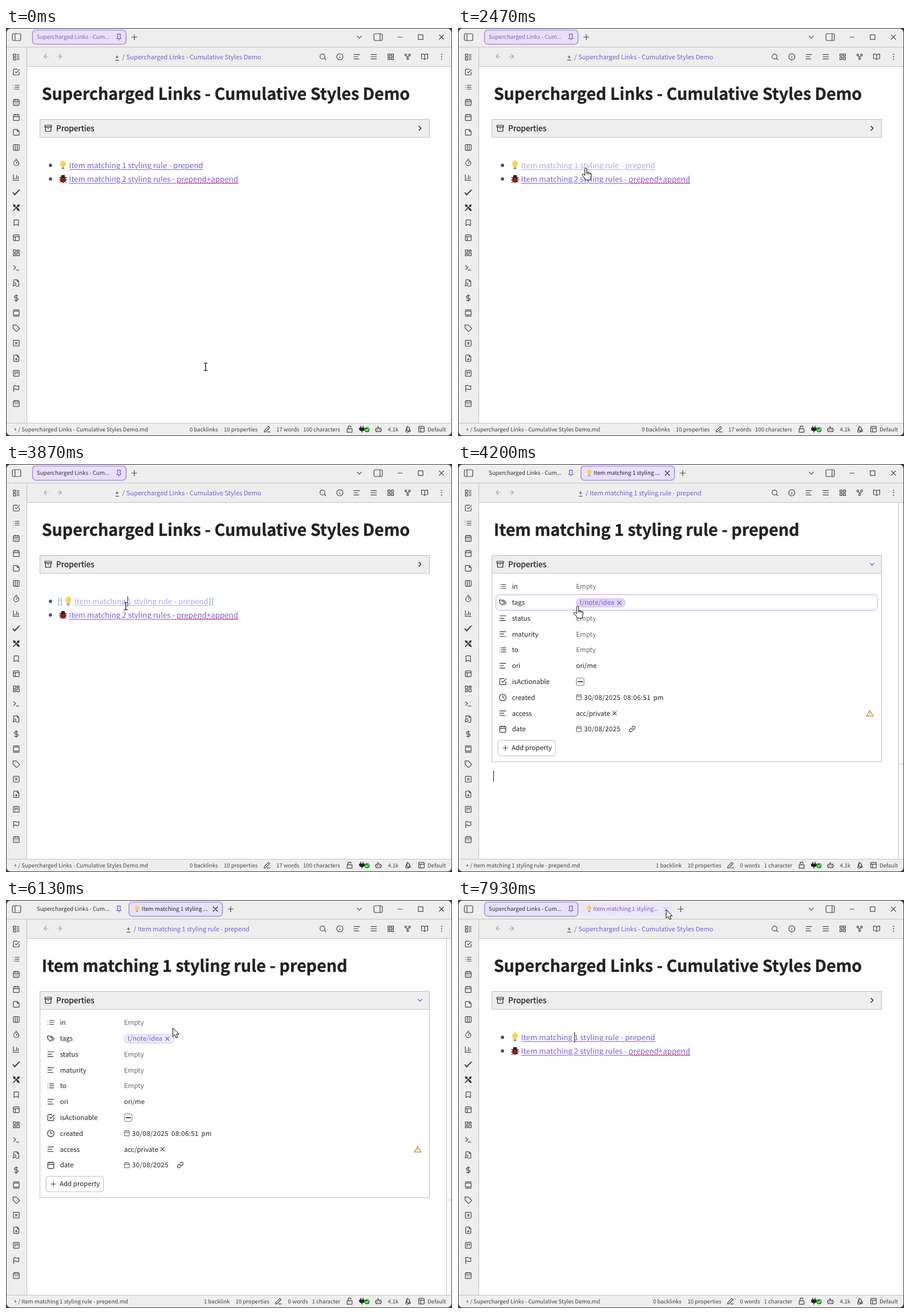
Animation, 782 px wide and 716 px high, one loop 8 s. Source, as an HTML page:

```html
<!DOCTYPE html>
<html lang="en">
<head>
<meta charset="utf-8">
<title>Supercharged Links - Cumulative Styles Demo</title>
<style>
html, body { margin: 0; width: 100%; height: 100%; overflow: hidden; background: #3b3b3b; }
svg { display: block; }
text { font-family: "Noto Sans CJK SC", "Noto Sans CJK JP", "Noto Sans", sans-serif; fill: #222; white-space: pre; text-rendering: geometricPrecision; }
.icon { fill: none; stroke: #484848; stroke-width: 1.2; stroke-linecap: round; stroke-linejoin: round; }
.icon, .line { vector-effect: non-scaling-stroke; }
.line { fill: none; stroke: #c2c2c2; }
.title { font-weight: 700; stroke: #222; stroke-width: .35; }
.semi { stroke: #222; stroke-width: .3; }
.purple { fill: #7a5be0; }
.accent { stroke: #7a5be0; }
.pale { stroke: #aaa; }
.muted { fill: #666; }
.status { fill: #444; }
.date { letter-spacing: .4px; }
.link { --c: #7a5be0; }
.link.hover { --c: #b8a4ec; }
.link text { fill: var(--c); stroke: #fff; stroke-width: 2; paint-order: stroke; }
.link .under { stroke: var(--c); }
.bracket { fill: #5f87a5; }
.active { fill: #e8e1fc; stroke: #a58fee; stroke-width: 1.6; }
#tabName { fill: #7a5be0; }
#tabName.dark { fill: #333; }
#pill rect { fill: #f1ecfd; stroke: #c7b8f5; }
#pill.hover rect { fill: #dfd5fb; }
.pointer { fill: #fff; stroke: #000; stroke-linejoin: round; }
</style>
</head>
<body>
<svg id="stage" width="782" height="716"></svg>
<script>
const box = 'M5 3h14a2 2 0 0 1 2 2v14a2 2 0 0 1-2 2H5a2 2 0 0 1-2-2V5a2 2 0 0 1 2-2z';
const calendar = 'M5 4h14a2 2 0 0 1 2 2v14a2 2 0 0 1-2 2H5a2 2 0 0 1-2-2V6a2 2 0 0 1 2-2zM16 2v4M8 2v4M3 10h18';
const page = 'M15 2H6a2 2 0 0 0-2 2v16a2 2 0 0 0 2 2h12a2 2 0 0 0 2-2V7zM15 2v5h5';
const panel = 'M4 3h16a3 3 0 0 1 3 3v12a3 3 0 0 1-3 3H4a3 3 0 0 1-3-3V6a3 3 0 0 1 3-3z';
const shapes = {
  entries: 'M3 3h7v7H3zM3 14h7v7H3zM14 4h7M14 9h7M14 15h7M14 20h7',
  check: 'M9 11l3 3L22 4M21 12v7a2 2 0 0 1-2 2H5a2 2 0 0 1-2-2V5a2 2 0 0 1 2-2h11',
  list: 'M8 6h13M8 12h13M8 18h13M3 6h.01M3 12h.01M3 18h.01',
  days: calendar + 'M8 14h.01M12 14h.01M16 14h.01M8 18h.01M12 18h.01M16 18h.01',
  calendar,
  note: 'M15 3H5a2 2 0 0 0-2 2v14a2 2 0 0 0 2 2h14a2 2 0 0 0 2-2V9zM15 3v6h6',
  columns: box + 'M9 3v18M15 3v18',
  timer: 'M10 2h4M12 14l3-3M4 14a8 8 0 1 0 16 0 8 8 0 1 0-16 0',
  chart: 'M3 3v18h18M8 17v-3M13 17V5M18 17V9',
  ticks: 'M1 13l6 7L23 3M2 12l5 5L20 4',
  tools: 'M3 3l18 18M21 3L3 21M3 3l2 6 4-4zM21 3l-6 2 4 4zM17 14l4 6M14 17l6 4',
  bookmark: 'M19 21l-7-4-7 4V5a2 2 0 0 1 2-2h10a2 2 0 0 1 2 2z',
  layout: box + 'M3 9h18M9 21V9',
  dashboard: 'M3 3h7v8H3zM14 3h7v5h-7zM14 12h7v9h-7zM3 15h7v6H3z',
  terminal: 'M4 17l6-6-6-6M12 19h8',
  lookup: 'M4 10V4a2 2 0 0 1 2-2h9l5 5v13a2 2 0 0 1-2 2h-6M15 2v5h5M3 16a4 4 0 1 0 8 0 4 4 0 1 0-8 0M4 19l-2 3',
  dollar: 'M12 1v22M17 5H9.5a3.5 3.5 0 0 0 0 7h5a3.5 3.5 0 0 1 0 7H6',
  gallery: 'M3 2h18M3 22h18M3 6h18v12H3z',
  tag: 'M2 2h10l9.5 9.5a2 2 0 0 1 0 3l-7 7a2 2 0 0 1-3 0L2 12zM7 7h.01',
  tags: 'M2 5h7l7 7a2 2 0 0 1 0 3l-4 4a2 2 0 0 1-3 0l-7-7zM6 9h.01M14 5l7 7a2 2 0 0 1 0 3l-4 4',
  crossBox: box + 'M9 9l6 6M15 9l-6 6',
  filePlus: page + 'M12 18v-6M9 15h6',
  kanban: box + 'M8 7v9M12 7v4M16 7v6',
  flag: 'M4 22V4s1-1 4-1 5 2 8 2 4-1 4-1v11s-1 1-4 1-5-2-8-2-4 1-4 1',
  panelLeft: panel + 'M8 3v18',
  panelRight: panel + 'M17 3v18',
  pin: 'M12 17v5M5 17h14l-3-6V5h1V2H7v3h1v6z',
  plus: 'M5 12h14M12 5v14',
  minus: 'M5 12h14',
  cross: 'M6 6l12 12M18 6L6 18',
  square: 'M5 5h14v14H5z',
  down: 'M6 9l6 6 6-6',
  right: 'M9 6l6 6-6 6',
  back: 'M19 12H5M12 5l-7 7 7 7',
  forward: 'M5 12h14M12 5l7 7-7 7',
  search: 'M3 11a8 8 0 1 0 16 0 8 8 0 1 0-16 0M17 17l5 5',
  info: 'M2 12a10 10 0 1 0 20 0 10 10 0 1 0-20 0M12 16v-4M12 8h.01',
  lines: 'M3 5h18M3 12h12M3 19h16',
  menu: 'M3 5h18M3 12h18M3 19h18',
  grid: 'M3 3h7v7H3zM14 3h7v7h-7zM14 14h7v7h-7zM3 14h7v7H3z',
  fork: 'M9 18a3 3 0 1 0 6 0 3 3 0 1 0-6 0M3 6a3 3 0 1 0 6 0 3 3 0 1 0-6 0M15 6a3 3 0 1 0 6 0 3 3 0 1 0-6 0M6 9l6 4 6-4M12 13v2',
  book: 'M12 20V6q-2-3-10-3v15q8 0 10 3 2-3 10-3V3q-8 0-10 3',
  more: 'M12 4h.01M12 12h.01M12 20h.01',
  pencil: 'M12 21h9M16 3l4 4L7 20l-5 1 1-5z',
  unlock: 'M4 11h16v11H4zM7 11V7a5 5 0 0 1 10-1',
  plug: 'M8 8V2M16 8V2M4 8h16v3q0 5-5 6H9q-5-1-5-6zM12 17v5',
  robot: 'M4 9h16v11H4zM12 9V4H9M1 14h3M20 14h3M9 13v2M15 13v2',
  sheets: 'M4 19L9 3l7 4v13l-8 2zM9 3l-1 12 8 5M16 9l4 9-4 2',
  archive: 'M2 3h20v5H2zM4 8v13h16V8M10 12h4',
  clock: 'M2 12a10 10 0 1 0 20 0 10 10 0 1 0-20 0M12 6v6l4 2',
  chain: 'M10 13a5 5 0 0 0 7 1l4-4a5 5 0 0 0-7-7l-2 2M14 11a5 5 0 0 0-7-1l-4 4a5 5 0 0 0 7 7l2-2',
  warn: 'M12 3L1 21h22zM12 9v5M12 17h.01'
};

const text = (x, y, size, str, cls = '', id = '') =>
  `<text x="${x}" y="${y}" font-size="${size}" class="${cls}" id="${id}">${str}</text>`;
const icon = (name, x, y, size = 14, cls = '', style = '') =>
  `<path class="icon ${cls}" style="${style}" d="${shapes[name]}" transform="translate(${x - size / 2} ${y - size / 2}) scale(${size / 24})"/>`;
const path = (d, cls = 'line', style = '') => `<path class="${cls}" style="${style}" d="${d}"/>`;
const rect = (x, y, w, h, style, rx = 0, cls = '') =>
  `<rect x="${x}" y="${y}" width="${w}" height="${h}" rx="${rx}" class="${cls}" style="${style}"/>`;
const group = (id, ...parts) => `<g id="${id}">${parts.join('')}</g>`;
const edge = 'fill:none;stroke:#bfbfbf';

const bulb = (x, y, k = 1) => `<g transform="translate(${x} ${y}) scale(${k})">
  <path fill="#fbcf4b" d="M-2.2 3.5Q-2.2 1.6-4 0a4.9 4.9 0 1 1 8 0Q2.2 1.6 2.2 3.5z"/>
  <path fill="#fff0a8" d="M-3-3q1-2.4 3-2.3-1.8.8-2 3z"/>
  <path fill="#8f9aa3" d="M-2.2 3.5h4.4v2.4L1 7h-2l-1.2-1.1z"/></g>`;
const ladybug = (x, y) => `<g transform="translate(${x} ${y})" stroke="#222">
  <path d="M-7-3l3 1M7-3L4-2M-7 1.5h14M-6 6l3-2M6 6L3 4M-3-7l2 2M3-7L1-5" fill="none"/>
  <circle cy="-3.4" r="3.2" fill="#222"/><circle cy="1" r="5.6" fill="#d9272d" stroke="none"/>
  <path d="M-4.4-2.4Q0-6 4.4-2.4z" fill="#222"/>
  <path d="M0-4V6.5"/><g stroke="none" fill="#222"><circle cx="-2.7" cy="0" r="1.3"/><circle cx="2.7" cy="0" r="1.3"/>
  <circle cx="-2.4" cy="3.6" r="1.3"/><circle cx="2.4" cy="3.6" r="1.3"/></g></g>`;

const docName = 'Supercharged Links - Cumulative Styles Demo';
const noteName = 'Item matching 1 styling rule - prepend';

const ribbonNames = ('entries check list days calendar note columns timer chart ticks tools bookmark layout dashboard ' +
  'terminal lookup dollar gallery tag crossBox filePlus kanban flag days').split(' ');
const ribbon = ribbonNames.map((name, i) =>
  icon(name, 18, 51 + i * 26.43, 13.5, '', name === 'tools' ? 'stroke:#333;stroke-width:1.6' : ''));
const toolbar = 'search info lines menu grid fork book more'.split(' ')
  .map((name, i) => icon(name, 555.5 + i * 29.75, 50.5, 13, '', name === 'more' ? 'stroke-width:2' : ''));

const chrome = [
  rect(1, 1, 780, 714, 'fill:#eee', 7),
  rect(36, 68, 745, 625, 'fill:#fff'),
  path('M1 33.5H781M36 67.5H781M36.5 34V693M1 693.5H781'),
  icon('panelLeft', 18.5, 16, 16),
  icon('down', 619.5, 16, 15), icon('panelRight', 652.5, 16, 16),
  icon('minus', 691, 16, 13), icon('square', 727, 16, 14), icon('cross', 763.5, 16, 15),
  icon('back', 70.5, 50, 13, 'pale'), icon('forward', 93.5, 50, 13, 'pale'),
  ...ribbon, ...toolbar,
  icon('unlock', 602.5, 704, 13),
  icon('plug', 624, 704, 12.5, '', 'fill:#222;stroke:#222;stroke-width:1.4'),
  '<circle cx="633" cy="705" r="4.6" fill="#149c19"/>',
  path('M630.8 705l1.6 1.7 3-3.4', 'icon', 'stroke:#fff'),
  icon('robot', 653, 704, 13), text(669.5, 708, 9.6, '4.1k', 'status'),
  icon('sheets', 705, 704, 13), icon('layout', 728.5, 704, 13), text(739, 708, 9.6, 'Default', 'status')
];

const crumb = (x, name) => text(x, 55, 11.1, '+') + path(`M${x} 56.5h6.5`, 'line', 'stroke:#333') +
  text(x + 12, 55, 11.1, '/', 'muted') + text(x + 19.3, 55, 11.1, name, 'purple');
const panelHead = chevron => rect(59.5, 160.5, 683, 31.5, 'fill:#eee;stroke:#bfbfbf') +
  icon('archive', 74, 176, 14, '', 'stroke:#222') + text(88, 181, 13.8, 'Properties', 'semi') + chevron;

const squiggle = 'M300 272' + 'l1-1 2 2 1-1'.repeat(26) + 'l1-1 2 2';
const doc = group('doc',
  crumb(191.7, docName), text(62.7, 126, 28.66, docName, 'title'),
  panelHead(icon('right', 726, 176, 14, '', 'stroke:#222;stroke-width:1.5')),
  '<circle cx="78" cy="241" r="2.9" fill="#555"/><circle cx="78" cy="265" r="2.9" fill="#555"/>',
  group('brackets', text(90.5, 246, 13.32, '[[', 'bracket'), text(355, 246, 13.32, ']]', 'bracket')),
  `<g id="first" class="link">${bulb(100, 241)}${path('M111 248.5H346', 'line under')}${text(110.6, 246, 13.32, noteName)}</g>`,
  `<g id="second" class="link">${ladybug(100, 265)}${path('M111 272.5H407', 'line under')}${text(110.6, 270, 13.32, 'Item matching 2 styling rules - prepend+append')}${path(squiggle, 'line', 'stroke:#e5202b')}</g>`,
  path('M0 232v18', 'line', 'stroke:#222').replace('<path', '<path id="docCaret"'));

const rows = [
  ['list', 'in', 'Empty'], ['tags', 'tags'], ['lines', 'status', 'Empty'], ['lines', 'maturity', 'Empty'],
  ['list', 'to', 'Empty'], ['lines', 'ori', 'ori/me'], ['check', 'isActionable'], ['clock', 'created'],
  ['lines', 'access', 'acc/private'], ['calendar', 'date']
].map(([name, label, value], i) => {
  const y = 215 + i * 27.8;
  return icon(name, 78.5, y, 14, '', 'stroke:#333') + text(94.7, y + 4.2, 11.5, label) +
    (value ? text(207, y + 4.2, 11.5, value, value === 'Empty' ? 'muted' : '') : '');
});

const note = group('note',
  crumb(211.7, noteName), text(62.7, 126, 28.66, noteName, 'title'),
  rect(59.5, 160.5, 683, 362, edge),
  panelHead(icon('down', 726, 176, 14, 'accent')),
  rect(66.5, 229.5, 669, 27, 'fill:none;stroke:#b7a6f1', 6).replace('<rect', '<rect id="rowHover"'),
  ...rows,
  group('pill', rect(207.5, 236.5, 86, 14.5, '', 7.2), text(213, 247.4, 11.5, 't/note/idea', 'purple'), icon('cross', 283, 243.5, 13, 'accent')),
  rect(207.5, 375.5, 13.5, 13, 'fill:#fff;stroke:#777', 2.5), path('M210 382h9', 'line', 'stroke:#222;stroke-width:1.6'),
  icon('calendar', 212, 409, 11.5, '', 'stroke:#777'), icon('calendar', 212, 465, 11.5, '', 'stroke:#777'),
  text(221, 413.6, 11.5, '30/08/2025', 'date'), text(290, 413.6, 11.5, '08:06:51', 'date'), text(342.5, 413.6, 11.5, 'pm'),
  text(221, 469.4, 11.5, '30/08/2025', 'date'), icon('chain', 305.5, 465, 12),
  icon('cross', 274.5, 437.5, 12), icon('warn', 722, 437.5, 13, '', 'stroke:#c8852c'),
  rect(70, 485, 101, 27, 'fill:#fff;stroke:#bdbdbd', 4), icon('plus', 83, 498.5, 14), text(94, 502.4, 11.5, 'Add property'),
  path('M772.5 68V693M772 526.5H781'),
  path('M62.5 538v20', 'line', 'stroke:#222').replace('<path', '<path id="noteCaret"'));

const noteTab = 'Item matching 1 styling';
const tabs = [
  rect(46.5, 3.5, 164, 25, '', 6, 'active').replace('<rect', '<rect id="docTab"'),
  text(53.8, 19.3, 9.83, 'Supercharged Links - Cum...', '', 'tabName'), icon('pin', 198, 16, 13, 'accent'),
  group('plusOnly', icon('plus', 225, 16, 16)),
  group('noteTab', rect(215.5, 3.5, 164, 25, '', 6, 'active'), bulb(230, 16, .75),
    text(237.8, 19.3, 9.75, noteTab + ' ...'), icon('cross', 367, 16, 15, '', 'stroke:#222'), icon('plus', 394, 16, 16)),
  group('closingTab', rect(215, 4, 160, 24, 'fill:#ebe6f9', 6), bulb(230, 16, .75),
    text(237, 19.3, 9.75, noteTab + '...', 'purple'), icon('cross', 364.5, 16, 14, '', 'stroke:#c5b8ea'), icon('plus', 390.5, 16, 16))
];

const status = (id, name, pencilX, ...items) => group(id,
  text(13.8, 708, 9.6, `+ / ${name}.md`, 'status'), icon('pencil', pencilX, 704, 13),
  ...items.map(([x, str]) => text(x, 708, 9.6, str, 'status')));
const noteCounts = [[402.5, '10 properties'], [494.5, '0 words'], [536.5, '1 character']];

const beam = 'M-3.5-6.5h2.5l1 1 1-1h2.5M0-5.5V5.5M-3.5 6.5h2.5l1-1 1 1h2.5';
const pointers = group('pointer',
  `<g id="beam" fill="none">${path(beam, '', 'stroke:#fff;stroke-width:2.6')}${path(beam, '', 'stroke:#000;stroke-width:1.2')}</g>`,
  `<g id="hand">${path('M-2 1.7a1.7 1.7 0 0 1 3.4 0v6l6 1.2q2.3.6 2 3l-.9 5.3q-.3 2-1 4h-8.2q-.5-2-2-3.6l-3.6-4.6q-1-1.6.4-2.2 1.5-.6 2.6 1l1.3 1.4zM1.4 7.7v3.5M4.2 8.4v3M7 9v3', 'pointer')}</g>`,
  `<g id="arrow">${path('M0 0v15l3.5-3.2 2.4 5.4 2.6-1.1-2.4-5.2h4.7z', 'pointer')}</g>`);

document.getElementById('stage').innerHTML = [
  ...chrome, ...tabs, doc, note,
  status('docStatus', docName, 458, [322, '0 backlinks'], [382, '10 properties'], [474, '17 words'], [521, '100 characters']),
  status('noteStatus', noteName, 478, [347, '1 backlink'], ...noteCounts),
  status('backStatus', docName, 478, [342, '0 backlinks'], ...noteCounts),
  pointers
].join('');

const $ = id => document.getElementById(id);
const show = (id, on) => { $(id).style.display = on ? '' : 'none'; };
const CLICK = 3733, OPEN = 4133, STATUS_BACK = 7733, CLOSE = 7866, BLINK = 533;

// time, x, y of the pointer's hot spot
const route = [
  [0, 350, 594.5], [267, 350, 594.5], [333, 356, 590], [467, 362, 570], [867, 270, 427], [1133, 270, 427],
  [1600, 202, 284], [1733, 198, 262], [1867, 188, 249], [2000, 178, 246], [2067, 178, 246],
  [2333, 201, 246.5], [2400, 201, 246.5], [2466, 224.5, 245.5], [2667, 214, 257], [3000, 214, 257],
  [3333, 210, 249.5], [4600, 210, 249.5], [5133, 275.5, 245], [5333, 301, 247], [5467, 301, 247],
  [5733, 285, 246], [6067, 285, 246], [6733, 361, 32], [6933, 361, 17], [7067, 363, 16],
  [7267, 363, 16], [7533, 365, 17], [8000, 365, 17]
];

function pointerAt(t) {
  const i = Math.max(1, route.findIndex(([time]) => time >= t));
  const [t0, x0, y0] = route[i - 1], [t1, x1, y1] = route[i];
  const k = (t - t0) / (t1 - t0);
  return [x0 + (x1 - x0) * k, y0 + (y1 - y0) * k];
}

function draw(now) {
  const t = Math.floor((now % 8000 + 5) * 15 / 1000) * 1000 / 15;
  const [x, y] = pointerAt(t);
  const onNote = t >= OPEN && t < CLOSE;
  const editing = t >= CLICK && t < OPEN;
  const overLinks = t < CLICK && y > 230 && y < 277;
  const overPill = onNote && x > 207 && x < 294 && y > 234 && y < 253;
  const overRow = onNote && y > 229;
  const kind = overLinks || overPill ? 'hand' : t < OPEN || overRow ? 'beam' : 'arrow';

  $('pointer').setAttribute('transform', `translate(${x} ${y})`);
  for (const id of ['beam', 'hand', 'arrow']) show(id, id === kind);

  show('doc', !onNote);
  show('note', onNote);
  show('docTab', !onNote);
  show('plusOnly', t < OPEN);
  show('noteTab', onNote);
  show('closingTab', t >= CLOSE);
  $('tabName').classList.toggle('dark', t >= CLICK);

  show('docStatus', t < OPEN);
  show('noteStatus', t >= OPEN && t < STATUS_BACK);
  show('backStatus', t >= STATUS_BACK);

  $('first').classList.toggle('hover', editing || overLinks && y < 253);
  $('second').classList.toggle('hover', overLinks && y >= 253);
  $('first').setAttribute('transform', `translate(${editing ? 9.2 : 0} 0)`);
  show('brackets', editing);
  show('docCaret', editing || t >= CLOSE);
  $('docCaret').setAttribute('transform', `translate(${editing ? 213.5 : 204.5} 0)`);

  $('pill').classList.toggle('hover', overPill);
  show('rowHover', overRow);
  show('noteCaret', t < STATUS_BACK && Math.floor((t - OPEN + 5) / BLINK) % 2 === 0);
  requestAnimationFrame(() => draw(performance.now()));
}
draw(0);
</script>
</body>
</html>
```
